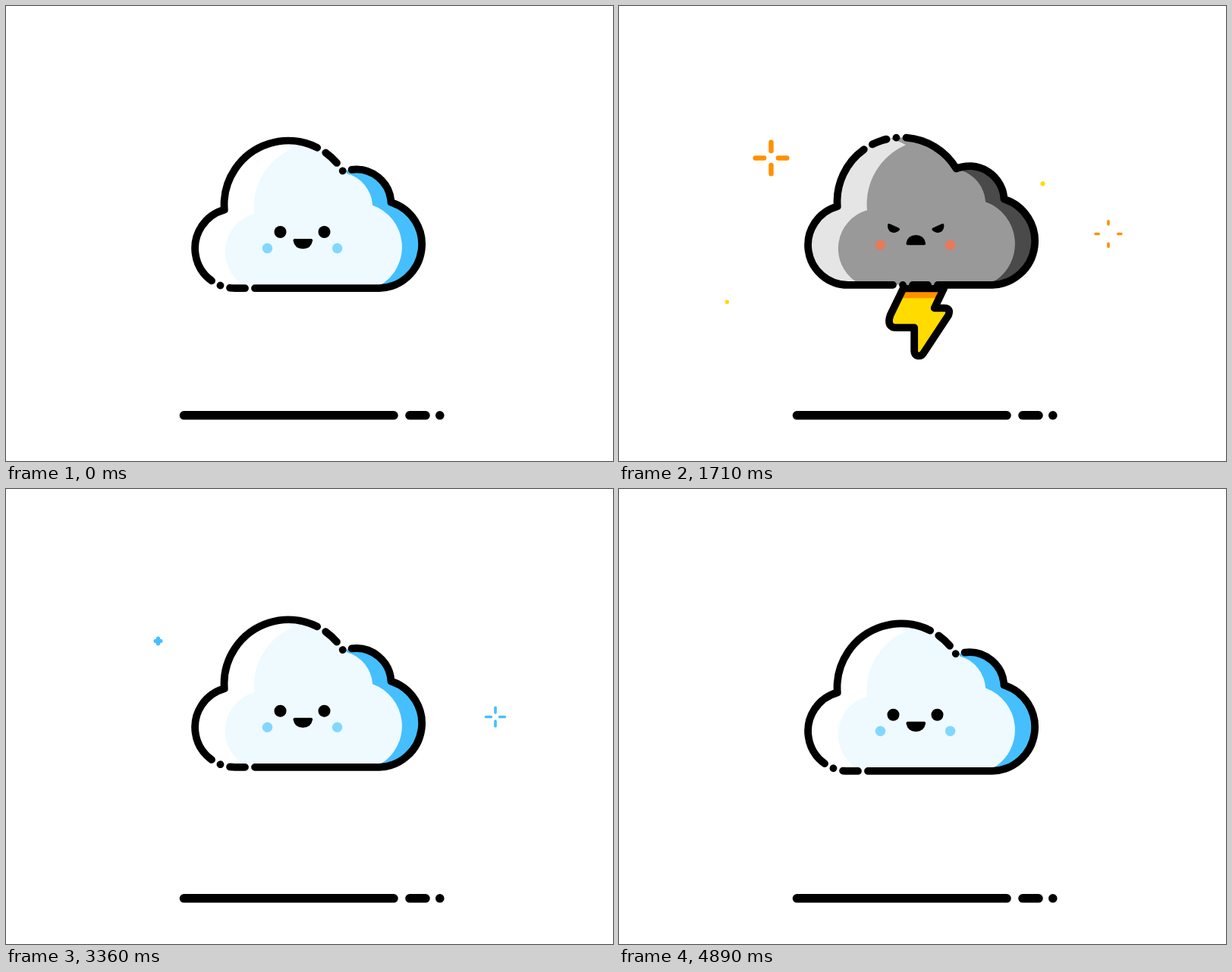
These frames come from a looping animation (800 px wide and 600 px high, 4920 ms). An HTML page:

```html
<!DOCTYPE html>
<html>
<head>
<meta charset="utf-8">
<style>
  html, body { margin: 0; width: 100%; height: 100%; overflow: hidden; background: #fff; }
  svg { display: block; width: 800px; height: 600px; }
  .line { fill: none; stroke: #000; stroke-width: 9.8; stroke-linecap: round; stroke-linejoin: round; }
</style>
</head>
<body>
<svg viewBox="0 0 800 600">
  <defs>
    <path id="cloudShape" d="M492 372.5H302A52.7 52.7 0 0 1 287.8 269A84.5 84.5 0 0 1 444.5 219A46 46 0 0 1 507.5 259.2A58 58 0 0 1 492 372.5Z"/>
    <path id="boltShape" d="M377 377L360 412Q354 429 369 428.8H391.5V460C391.5 467 400 468 403.5 462.5L436.5 412.5Q440 403 431 403H418L430.5 377Z"/>
    <path id="angryEye" d="M354 294Q354 290.3 357.5 292.2L369 297.5Q371 299 369 301C365 305 354 305.5 354 294Z"/>
    <clipPath id="cloudClip"><use href="#cloudShape"/></clipPath>
    <clipPath id="boltClip"><use href="#boltShape"/></clipPath>
  </defs>

  <path class="line" style="stroke-width:11.6" d="M234.5 539.8H511M532 539.8H553M571.8 539.8h.01"/>

  <g id="bolt">
    <use href="#boltShape" fill="#ffdb00"/>
    <path d="M340 370H450V390H340Z" fill="#ff9100" clip-path="url(#boltClip)"/>
    <use href="#boltShape" class="line"/>
  </g>

  <g id="cloud">
    <g clip-path="url(#cloudClip)">
      <use id="body" href="#cloudShape"/>
      <path id="light" d="M316 372L312 368A52.5 52.5 0 0 1 327 274A84.5 84.5 0 0 1 378 188Q370 183 360 181L340 160H230V380Z"/>
      <path id="shade" d="M449 221A46 46 0 0 1 483 263A58.5 58.5 0 0 1 494 368L490 380H600V200H445Z"/>
    </g>
    <use id="outline" href="#cloudShape" class="line"/>
    <g id="cheeks">
      <circle cx="344.5" cy="319.8" r="6.7"/>
      <circle cx="436.6" cy="319.8" r="6.7"/>
    </g>
    <g id="angryEyes">
      <use href="#angryEye"/>
      <use href="#angryEye" transform="translate(782.4) scale(-1 1)"/>
    </g>
    <g id="happyEyes">
      <circle cx="361.5" cy="298.3" r="8"/>
      <circle cx="419.5" cy="298.3" r="8"/>
    </g>
    <path id="mouth" d="M380.5 307.3H402Q404.5 307.3 404 310Q402 320.5 391.3 320.5Q380.5 320.5 378.6 310Q378.3 307.3 380.5 307.3Z"/>
  </g>

  <g id="effects"></g>
</svg>
<script>
const LOOP = 4920;
const byId = id => document.getElementById(id);
const set = (el, attrs) => { for (const k in attrs) el.setAttribute(k, attrs[k]); };
const clamp = v => Math.max(0, Math.min(1, v));
const smooth = v => { v = clamp(v); return v * v * (3 - 2 * v); };
const ramp = (t, from, to) => smooth((t - from) / (to - from));

// 0 = happy, 1 = angry; each part has its own windows in and out
const mood = (t, inFrom, inTo, outFrom, outTo) => ramp(t, inFrom, inTo) - ramp(t, outFrom, outTo);
const mix = (a, b, p) => `rgb(${a.map((v, i) => Math.round(v + (b[i] - v) * p))})`;

const COLORS = {
  body: [[238, 250, 255], [153, 153, 153]],
  light: [[255, 255, 255], [229, 229, 229]],
  shade: [[70, 191, 255], [74, 74, 74]],
};
const CHEEKS = [[130, 215, 255], [230, 122, 89]];

// x, y, scale, start while angry, start while happy
const SPARKLES = [
  [568.3, 116, 1, 555, 3990],
  [455, 77, .52, 1045, 3862],
  [645, 300.5, .4, 1135, 2945],
  [200.5, 200.5, .7, 1305, 3228],
  [182.3, 146, 1, 1753, 4238],
];
// x, y, start while angry, start while happy
const DOTS = [
  [558.5, 234.3, 1280, 3940],
  [142.4, 390.3, 1275, 3940],
  [662.4, 390.3, 1815, 3392],
];
const SPARKLE_LIFE = 650, DOT_LIFE = 500, RAY = 43.5;

function addEffect(tag) {
  const el = document.createElementNS('http://www.w3.org/2000/svg', tag);
  byId('effects').append(el);
  return el;
}
const sparkleEls = SPARKLES.map(() => addEffect('path'));
const dotEls = DOTS.map(() => addEffect('circle'));
sparkleEls.forEach(el => set(el, { 'stroke-linecap': 'round', fill: 'none' }));

function drawSparkle(el, [x, y, scale, angryStart, happyStart], t) {
  const happy = t >= happyStart;
  const u = (t - (happy ? happyStart : angryStart)) / SPARKLE_LIFE;
  const alive = u > 0 && u < 1;
  el.style.display = alive ? '' : 'none';
  if (!alive) return;
  const outer = RAY * smooth(u), inner = Math.min(outer - .01, RAY * u ** 2.5);
  const rays = [[1, 0], [0, 1], [-1, 0], [0, -1]]
    .map(([dx, dy]) => `M${dx * inner} ${dy * inner}L${dx * outer} ${dy * outer}`);
  set(el, {
    d: rays.join(''),
    transform: `translate(${x} ${y}) scale(${scale})`,
    stroke: happy ? '#46bfff' : '#ff9100',
    'stroke-width': 9.2 * clamp(u / .25),
  });
}

function drawDot(el, [cx, cy, angryStart, happyStart], t) {
  const happy = t >= happyStart;
  const u = (t - (happy ? happyStart : angryStart)) / DOT_LIFE;
  set(el, {
    cx, cy,
    r: 7 * Math.min(smooth(u / .4), smooth((1 - u) / .3)),
    fill: happy ? '#46bfff' : '#ffdb00',
  });
}

function bob(t) {
  const phase = (((t - 30) / 990) % 1 + 1) % 1;
  const p = 1 - Math.abs(2 * phase - 1);
  return -.3 - 6 * (p < .5 ? .5 * (2 * p) ** 2.5 : 1 - .5 * (2 - 2 * p) ** 2.5);
}

const squash = (el, y, s) => set(el, { transform: `translate(0 ${y * (1 - s)}) scale(1 ${s})` });

// Two long strokes, each followed by a dash and a dot
const breakDashes = '13 20 13 .01 13';
const topStroke = 296.9;
const bottomStroke = byId('cloudShape').getTotalLength() - topStroke - 118.02;
set(byId('outline'), { 'stroke-dasharray': `${topStroke} ${breakDashes} ${bottomStroke} ${breakDashes}` });

function draw(t) {
  const dy = bob(t);
  set(byId('cloud'), { transform: `translate(0 ${dy})` });

  const tint = mood(t, 240, 720, 2700, 3180);
  for (const id in COLORS) set(byId(id), { fill: mix(...COLORS[id], tint) });
  set(byId('cheeks'), { fill: mix(...CHEEKS, mood(t, 240, 500, 2700, 2940)) });
  set(byId('outline'), { 'stroke-dashoffset': -223 + 92 * mood(t, 200, 670, 2660, 3130) });

  const eyes = 2 * mood(t, 240, 640, 2700, 3100) - 1;
  squash(byId('angryEyes'), 298, Math.max(0, eyes));
  squash(byId('happyEyes'), 298.3, Math.max(0, -eyes));
  squash(byId('mouth'), 313.6, 1 - 2 * mood(t, 240, 550, 2700, 3010));

  const out = mood(t, 580, 930, 2340, 2700);
  const slide = dy - 105 * (1 - out);
  byId('bolt').style.display = out > 0 ? '' : 'none';
  set(byId('bolt'), { transform: `translate(${slide * .5} ${slide})` });

  SPARKLES.forEach((s, i) => drawSparkle(sparkleEls[i], s, t));
  DOTS.forEach((d, i) => drawDot(dotEls[i], d, t));
}

const begin = performance.now();
function tick() {
  draw((performance.now() - begin) % LOOP);
  requestAnimationFrame(tick);
}
tick();
</script>
</body>
</html>
```
